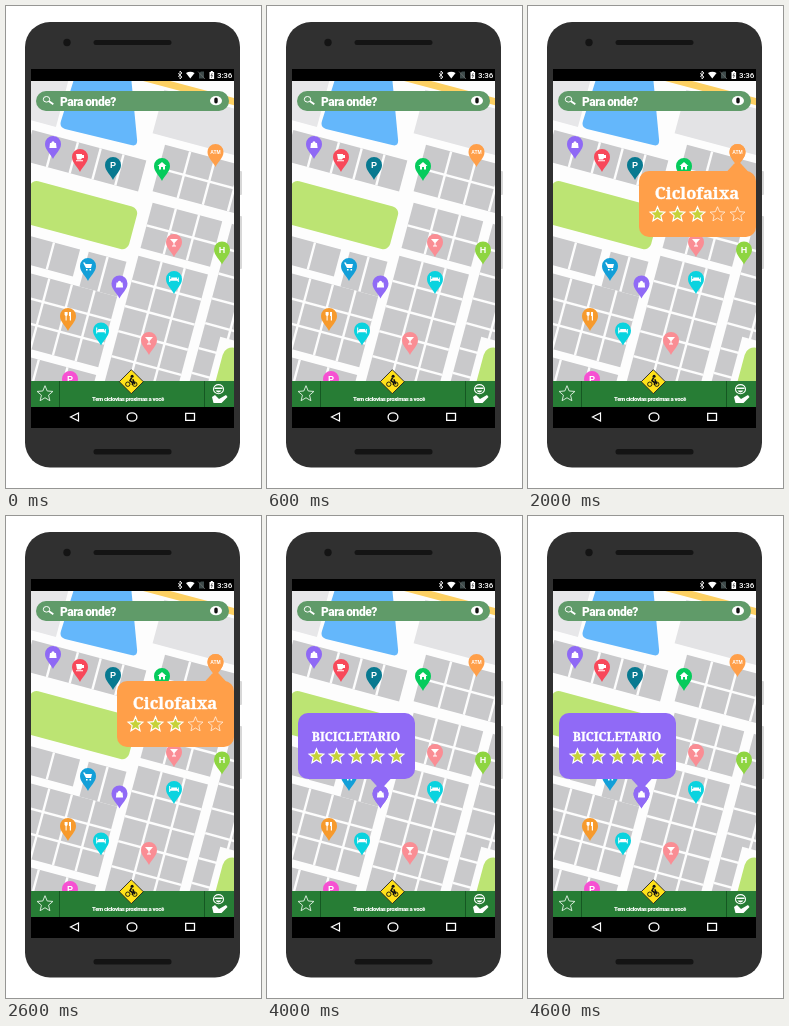
An HTML page with a canvas that plays this animation: 255 by 482 pixels, repeating every 5 s.

```html
<!DOCTYPE html>
<html lang="pt">
<head>
<meta charset="utf-8">
<title>Mapa de ciclovias</title>
<style>
html, body { margin: 0; width: 100%; height: 100%; overflow: hidden; background: #fff; }
canvas { display: block; width: 255px; height: 482px; }
</style>
</head>
<body>
<canvas id="stage"></canvas>
<script>
const W = 255, H = 482, STEP = 1000, TILT = Math.PI / 12;
const GRAY = '#c9c9cb', ROAD = '#fdfdfd', GRASS = '#bce473', BAR = '#277d35';
const canvas = document.getElementById('stage');
const dpr = window.devicePixelRatio || 1;
canvas.width = W * dpr;
canvas.height = H * dpr;
const c = canvas.getContext('2d');

function rect(x, y, w, h, color, r = 0) {
  c.fillStyle = color;
  c.beginPath();
  c.roundRect(x, y, w, h, r);
  c.fill();
}
function oval(x, y, rx, ry, fill, edge, lw = 1) {
  c.beginPath();
  c.ellipse(x, y, rx, ry, 0, 0, 7);
  paint(null, fill, edge, lw);
}
function paint(path, fill, edge, lw = 1) {
  const p = path ? [path] : [];
  c.lineWidth = lw;
  if (fill) { c.fillStyle = fill; c.fill(...p); }
  if (edge) { c.strokeStyle = edge; c.stroke(...p); }
}
const shape = (d, fill, edge, lw) => paint(new Path2D(d), fill, edge, lw);
function text(s, x, y, font, gap = 0, align = 'left') {
  c.font = font;
  c.letterSpacing = gap + 'px';
  c.textAlign = align;
  c.fillStyle = '#fff';
  c.fillText(s, x, y);
}
function star(x, y, r, fill, edge, lw) {
  c.beginPath();
  for (let i = 0; i < 10; i++) {
    const a = i * Math.PI / 5 - Math.PI / 2, d = i % 2 ? r * 0.45 : r;
    c.lineTo(x + d * Math.cos(a), y + d * Math.sin(a));
  }
  c.closePath();
  paint(null, fill, edge, lw);
}

// white symbols around the centre of a pin head
const icons = {
  bag: 'M-3-1h1.4a1.6 1.8 0 0 1 3.2 0H3l.6 5h-7.2z',
  cup: 'M-4-3h6v1h2v3H2L1 2.5h-4zM-4 3.2h7v1h-7z',
  house: 'M0-4 4.5 0H3v3.5H1V1h-2v2.5h-2V0h-1.5z',
  drink: 'M-4-3h8L.5 1v2.5H2v1h-4v-1h1.5V1z',
  cart: 'M-5-3.5h2l.5 1.5H4L3 2h-5zM-2 3h1.6v1.6H-2zM1.5 3h1.6v1.6H1.5z',
  bed: 'M-4.8-3h1v3h1v-1.6h5.8V0h.8v-1.5h1V3h-1V1.8h-7.6V3h-1z',
  fork: 'M-3.4-4h3v3l-1 1v4.5h-1V0l-1-1zM1-4h2v8.5H1.8V0H1z'
};

const pins = [
  [47, 138, '#8f69f5', 'bag'], [74, 151, '#f8485a', 'cup'],
  [107, 159, '#087990', 'P'], [156, 160, '#06cb5c', 'house'],
  [209.5, 146, '#ff9f49', 'ATM'], [168, 236, '#fa8d94', 'drink'],
  [216, 243.5, '#8ed541', 'H'], [82, 260, '#129fd8', 'cart'],
  [168, 273, '#0ad3df', 'bed'], [113.5, 277.5, '#906af6', 'bag'],
  [62, 310, '#f79a2c', 'fork'], [95, 324.5, '#0ad3df', 'bed'],
  [143, 334, '#fa8d94', 'drink'], [64, 373, '#f650d2', 'P']
];
function pin([x, y, color, icon]) {
  c.save();
  c.translate(x, y);
  shape('M0 15C-2 10-8 6-8 0A8 8 0 0 1 8 0C8 6 2 10 0 15z', color);
  if (icons[icon]) shape(icons[icon], '#fff');
  else {
    const size = icon.length > 1 ? 5 : 9;
    text(icon, 0, size * 0.36, `bold ${size}px "Liberation Sans", sans-serif`, 0, 'center');
  }
  c.restore();
}

// city block cut into near-square lots
function block(x, y, w, h) {
  rect(x, y, w, h, GRAY);
  const cols = Math.round(w / 26), rows = Math.round(h / 25);
  for (let i = 1; i < cols; i++) rect(x + i * w / cols - 1.2, y, 2.4, h, ROAD);
  for (let i = 1; i < rows; i++) rect(x, y + i * h / rows - 1.2, w, 2.4, ROAD);
}

function map() {
  rect(25, 75, 203, 300, ROAD);
  c.save();
  c.translate(25, 75);
  c.rotate(TILT);
  rect(-20, -20, 56, 58, '#e7e7e9');
  rect(131, -26, 130, 45, '#e3e3e5');
  rect(90, -36, 150, 7, '#fdd063');
  block(14, 47, 118, 32);
  block(146, 27, 104, 48);
  block(149, 86, 72, 47);
  block(149, 141, 72, 130);
  block(231, 86, 78, 180);
  block(10, 150, 81, 28);
  block(100, 150, 39, 36);
  block(22, 186, 117, 73);
  block(50, 267, 89, 50);
  rect(26, 95, 111, 44, GRASS, 7);
  rect(249, 198, 80, 90, ROAD);
  rect(256, 205, 80, 90, GRASS, 10);
  c.restore();
  shape('M69 70 55 115Q53 121 59 123L125 139Q132 141 131 133L125 70z', '#64b7fb');
  pins.forEach(pin);
}

function phone() {
  rect(231, 165, 5, 24, '#d8d8d8', 1);
  rect(231, 210, 5, 53, '#d8d8d8', 1);
  rect(19, 16, 215, 445.5, '#303030', 25);
  oval(61, 36.5, 3.7, 3.7, '#141414');
  rect(87.5, 34, 78, 5, '#141414', 2.5);
  rect(87.5, 443, 78, 5.5, '#141414', 2.5);
  rect(25, 63, 203, 359, '#000');
}

function statusBar() {
  shape('M172 67.2l4 3.8-2 2v-8l2 2-4 3.8', null, '#fff', 0.8);
  shape('M180 67q4.3-2.6 8.6 0l-4.3 5.5z', '#fff');
  shape('M193 67l2-1.5h3v7h-5z', '#3d4a4a');
  shape('M192 65.5l7 7.5', null, '#777', 0.7);
  shape('M203.5 66h1.3v-1h2v1h1.3v7h-4.6z', '#fff');
  shape('M206.3 67l-1.3 2.8 1.6-.4-1.2 2.6', null, '#222', 0.6);
  text('3:36', 211, 72.3, '500 8px Roboto, sans-serif', -0.15);
}

function searchBar() {
  rect(30, 85, 193, 20, '#609b69', 10);
  oval(40.5, 93.3, 3.2, 2.8, null, '#fff');
  shape('M43 95.3l4.3 3', null, '#fff', 1.8);
  text('Para onde?', 54, 99.6, '900 12px Roboto, sans-serif', -0.5);
  oval(210, 94.7, 6, 4.6, '#fff');
  rect(208.3, 91.4, 3.4, 6, '#111', 1.7);
}

function sign() {
  c.save();
  c.translate(125.3, 375.7);
  shape('M0-12 12 0 0 12-12 0z', '#ffe11a', '#222', 0.9);
  oval(-3.5, 2.5, 2.2, 2.2, null, '#111', 0.9);
  oval(3.5, 2.5, 2.2, 2.2, null, '#111', 0.9);
  oval(0.8, -5.5, 1.5, 1.5, '#111');
  shape('M.3-4-1.3-1 1.2.8v2.5M1.5-2.5l2 5', null, '#111', 1.6);
  c.restore();
}

function helper() {
  oval(212.5, 383.2, 5, 4.6, null, '#fff', 1.1);
  shape('M208.5 381.5h8v1.4h-8zM209.5 384.5h6q-3 4-6 0z', '#fff');
  shape('M206 391l3-2 4 4 7-4 1.5 2-6 6h-8z', '#fff');
}

function bottomBar() {
  rect(25, 375, 203, 26, BAR);
  rect(53, 375, 1, 26, '#155722');
  rect(198, 375, 1, 26, '#155722');
  star(39, 388, 8.3, null, '#e6f3e8', 0.9);
  text('Tem ciclovias proximas a você', 86, 395, '900 6px Roboto, sans-serif', -0.38);
  sign();
  helper();
  shape('M72.5 407v8l-8-4z', null, '#fff', 1.2);
  oval(126, 411, 4.9, 4.2, null, '#fff', 1.3);
  shape('M179.7 407.3h8.8v7h-8.8z', null, '#fff', 1.3);
}

const cards = [
  null,
  { x: 79, y: 183, pin: 2, rate: 4, size: 15, lines: ['Bike-friendly'] },
  { x: 111, y: 165, pin: 4, rate: 3, size: 16.5, lines: ['Ciclofaixa'] },
  { x: 79, y: 193, pin: 8, rate: 4, size: 10, gap: -0.6, lines: ['EST. DE', 'COMPARTILHAMENTO'] },
  { x: 31, y: 197, pin: 9, rate: 5, size: 12, lines: ['BICICLETARIO'] }
];
function card({ x, y, pin: id, rate, size, gap = 0, lines }) {
  const [px, py, color] = pins[id];
  const up = py < y, edge = up ? y + 1 : y + 65;
  shape(`M${px - 11} ${edge}L${px} ${edge + (up ? -12 : 12)}L${px + 11} ${edge}z`, color);
  rect(x, y, 117, 66, color, 10);
  c.fontVariantCaps = 'small-caps';
  lines.forEach((s, i) => {
    const base = y + 27.5 + (i - (lines.length - 1) / 2) * 9.5 - (lines.length - 1) * 2;
    text(s, x + 58, base, `900 ${size}px "Noto Serif", serif`, gap, 'center');
    c.strokeStyle = '#fff';
    c.lineWidth = 0.35;
    c.strokeText(s, x + 58, base);
  });
  c.fontVariantCaps = 'normal';
  for (let i = 0; i < 5; i++) {
    const on = i < rate;
    star(x + 18.5 + 20 * i, y + 43.5, 7.8, on && '#c6d23a', on ? '#fff' : '#ffffffc0', on ? 1.1 : 0.9);
  }
  pin(pins[id]);
}

const start = performance.now();
function draw(now) {
  const n = Math.floor(Math.max(0, now - start) / STEP) % cards.length;
  c.setTransform(dpr, 0, 0, dpr, 0, 0);
  c.clearRect(0, 0, W, H);
  phone();
  c.save();
  c.beginPath();
  c.rect(25, 75, 203, 300);
  c.clip();
  map();
  searchBar();
  if (cards[n]) card(cards[n]);
  c.restore();
  statusBar();
  bottomBar();
  requestAnimationFrame(draw);
}
draw(start);
</script>
</body>
</html>
```
